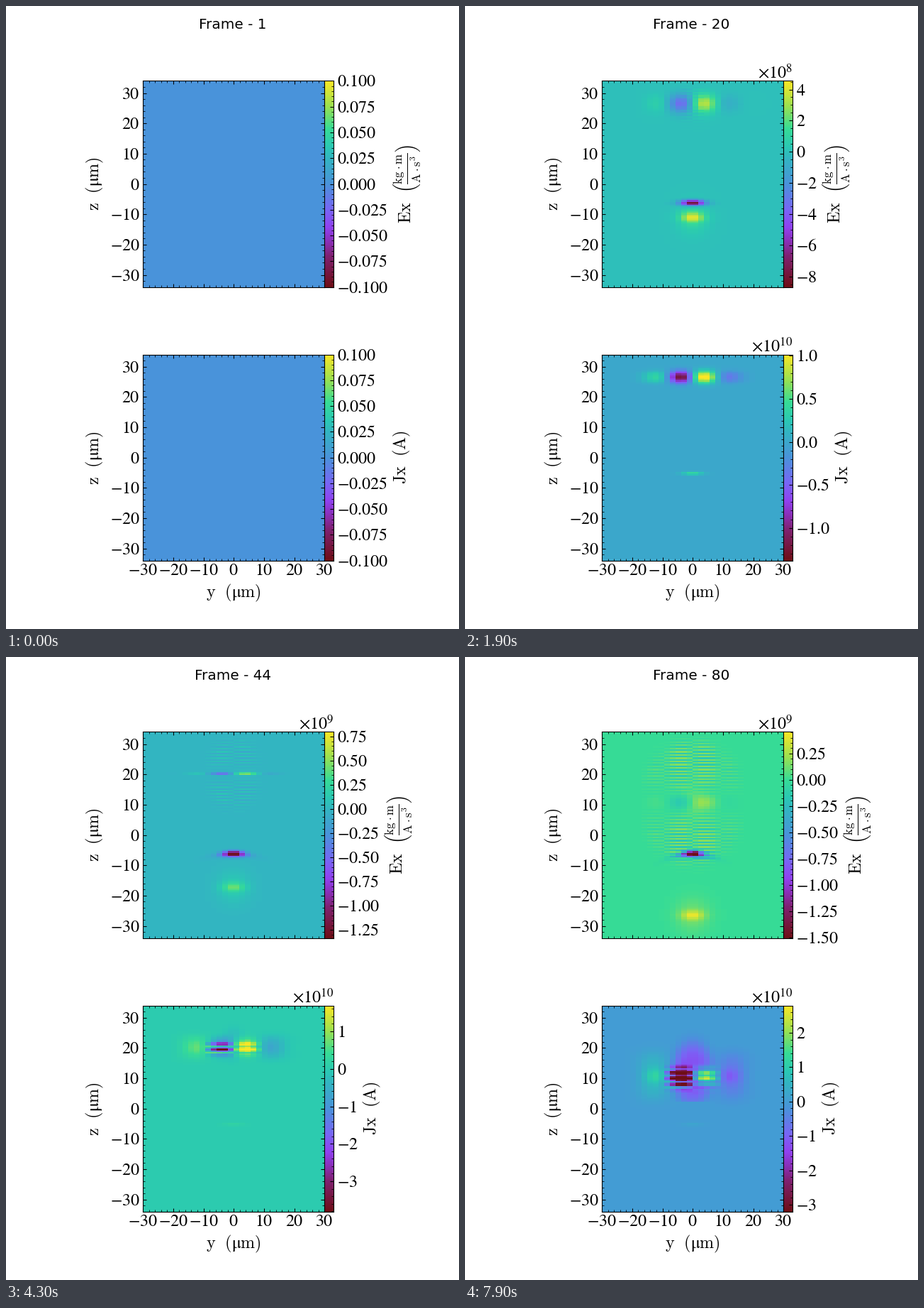
Animation of 639 by 877 pixels, one loop 8000 ms. Source, as a matplotlib script:

```python
import numpy as np
import matplotlib.pyplot as plt
from matplotlib.animation import FuncAnimation
from matplotlib.colors import LinearSegmentedColormap
from matplotlib.ticker import AutoMinorLocator, MaxNLocator

W, H, DPI = 639, 877, 128
PX = 72 / DPI  # points per pixel
FRAMES = 80
LEFT, SIDE, BAR = 193.2, 256, 12.8
TALL = SIDE * 68 / 60

plt.rcParams.update({
    "font.family": "Liberation Serif",
    "font.size": 24 * PX,
    "mathtext.fontset": "stix",
    "axes.linewidth": 1.07 * PX,
})

CMAP = LinearSegmentedColormap.from_list("tree", [
    (0, "#6e0e17"), (0.15, "#7f2272"), (0.22, "#8a30b8"), (0.29, "#9042f0"),
    (0.375, "#7866f5"), (0.5, "#4a93db"), (0.625, "#33b5c2"),
    (0.68, "#2bc8b4"), (0.77, "#37dc96"), (0.88, "#9ce150"), (1, "#fbe725"),
])

# Cell centres of the 32 x 128 grid
y = ((np.arange(32) + 0.5) / 32 * 60 - 30)[None, :]
z = ((np.arange(128) + 0.5) / 128 * 68 - 34)[:, None]
stripe = (-1.0) ** np.arange(128)[:, None]


def bell(u, width, power=2):
    return np.exp(-np.abs(u / width) ** power)


def ramp(n, start, end):
    return np.clip((n - start) / (end - start), 0, 1)


beam = np.sin(2 * np.pi * y / 18.75) * bell(y, 9.5) / 0.79
lobes = np.sign(beam) * np.sqrt(np.abs(beam))


def beam_depth(n):
    return z - (31.45 - 0.263 * n)


def ex_burst(n):
    return 0.54 * bell(n - 36, 8.5, 4)


def ex_limits(n):
    lo = -1.54 * (1 - np.exp(-max(n - 2, 0.3) / 20.5))
    hi = 0.455 * ramp(n, 0, 12) + ex_burst(n)
    return lo, hi


def jx_limits(n):
    lo = np.interp(n, (0, 12, 19, 30, 43, 79), (0, -.51, -1.38, -3.55, -3.81, -3.2))
    hi = min(0.058 * max(n - 1.5, 0.3), 1.69) + 0.00085 * max(n - 43, 0) ** 2
    return lo, hi


def ex_field(n):
    d = beam_depth(n)
    late = ramp(n, 43, 62)

    # Beam lobes, the thin front, and ripples inside a growing disc
    f = beam * (0.38 * bell(n - 14, 14) * bell(d, 1 + 0.1 * n)
                + 0.17 * late * bell(d, 2.3)
                + 1.9 * ex_burst(n) * bell(d, 0.4))
    disc = 1 / (1 + np.exp(np.hypot(1.1 * y, d) - 0.25 * n))
    f = f + 0.0022 * n * stripe * lobes * disc * (1 - bell(d, n / 12))
    f = f + 0.08 * ramp(n, 55, 79) * bell(y, 4) * bell(d, 6)

    # Pulse moving down
    u = z + 6.1 + 0.257 * n
    pulse = bell(y, 3.6) * bell(u, min(1.5, 0.08 * n))
    halo = bell(np.hypot(y, u), min(5.5, 0.25 * n))
    f = f + ramp(n, 0, 15) * (0.31 * pulse + 0.13 * halo)

    # Fixed emitter, bending into an arc
    bend = ramp(n, 12, 62)
    arc = bell(z + 6.2 + 0.022 * bend * y ** 2, 0.95)
    return f + ex_limits(n)[0] * arc * (bell(y, 4 - bend) + 0.3 * bend * bell(y, 6.5))


def jx_field(n):
    d = beam_depth(n)
    hi = jx_limits(n)[1]
    left = y < 0

    # Beam lobes split into layers that multiply with time
    f = 1.1 * hi * np.where(left, 1.1, 1) * beam * bell(d, min(2.4, 1 + 0.05 * n))
    layers = -np.cos(np.pi * (d - 0.2)) * bell(d + 0.01 * n, 0.045 * n + 0.1, 4)
    inner = lobes * (np.abs(y) < 9.4) * np.where(left, 1, 0.35)
    f = f + 2.1 * ramp(n, 20, 32) * inner * layers

    # Side lobes and the spreading negative cloud
    wing = bell(y + 13, 5) - bell(y - 13, 5)
    f = f + 0.007 * n * wing * bell(d, 0.1 * n, 4)
    size = 0.13 * n
    cloud = bell(np.hypot(y / (0.65 * size), (d - 1) / size), 1, 4)
    f = f - 1.25 * ramp(n, 35, 75) * cloud * (d > -8.7)

    # Fixed emitter
    glow = ramp(n, 0, 12) * (0.23 + 0.42 * bell(n - 12, 9))
    return f + glow * bell(y, 3.6) * bell(z + 5.2, 0.5)


def box(left, top, width):
    return [left / W, 1 - (top + TALL) / H, width / W, TALL / H]


class Panel:
    """Field map with its own colour bar."""

    def __init__(self, fig, top, name, field, limits, power):
        self.field, self.limits, self.power = field, limits, power
        ax = self.ax = fig.add_axes(box(LEFT, top, SIDE))
        self.img = ax.imshow(np.zeros((128, 32)), cmap=CMAP, origin="lower",
                             extent=(-30, 30, -34, 34), aspect="auto",
                             interpolation="nearest")
        marks = range(-30, 31, 10)
        names = [f"${v}$" for v in marks]
        ax.set_xticks(marks, names)
        ax.set_yticks(marks, names)
        for axis in (ax.xaxis, ax.yaxis):
            axis.set_minor_locator(AutoMinorLocator(5))
        ax.set_ylabel(r"$\rm{z}\ \ (\rm{μm})$", math_fontfamily="cm",
                      labelpad=6.5 * PX)

        cax = self.cax = fig.add_axes(box(LEFT + SIDE, top, BAR))
        cax.imshow(np.linspace(0, 1, 256)[:, None], cmap=CMAP, origin="lower",
                   extent=(0, 1, 0, 1), transform=cax.transAxes, aspect="auto")
        cax.set_xlim(0, 1)
        cax.set_xticks([])
        cax.yaxis.tick_right()
        cax.yaxis.set_label_position("right")
        cax.yaxis.set_minor_locator(AutoMinorLocator())
        cax.set_ylabel(name, math_fontfamily="cm", labelpad=5.3 * PX)

        for a in (ax, cax):
            for which, size, width in (("major", 4.67, 1.07), ("minor", 2.67, 0.8)):
                a.tick_params(which=which, direction="in", length=size * PX,
                              width=width * PX, pad=4.67 * PX)
        ax.tick_params(which="both", top=True, right=True)
        self.offset = fig.text((LEFT + SIDE + BAR) / W, 1 - (top - 4) / H, "",
                               ha="right", va="baseline")

    def draw(self, n):
        lo, hi = self.limits(n) if n else (-0.1, 0.1)
        self.img.set_data(self.field(n) if n else np.zeros((128, 32)))
        self.img.set_clim(lo, hi)

        locs = MaxNLocator(9, steps=[1, 2, 2.5, 5, 10]).tick_values(lo, hi)
        eps = (hi - lo) * 1e-6
        locs = locs[(locs >= lo - eps) & (locs <= hi + eps)]
        e = int(np.floor(np.log10(np.abs(locs).max()) + 1e-9)) if n else 0
        vals = locs / 10.0 ** e
        step = f"{vals[1] - vals[0]:.6g}"
        places = len(step.partition(".")[2])
        self.cax.set_yticks(locs, [f"${round(v, 6) + 0.0:.{places}f}$" for v in vals])
        self.cax.set_ylim(lo, hi)
        self.offset.set_text(rf"$\times 10^{{{self.power + e}}}$" if n else "")


fig = plt.figure(figsize=(W / DPI, H / DPI), dpi=DPI, facecolor="white")
title = fig.suptitle("", y=1 - 16.9 / H, family="DejaVu Sans", fontsize=20 * PX)

upper = Panel(
    fig, 105.45,
    r"$\rm{Ex}\ \ \left(\frac{\rm{kg}\cdot\rm{m}}{\rm{A}\cdot\rm{s}^{3}}\right)$",
    ex_field, ex_limits, 9)
lower = Panel(fig, 490.6, r"$\rm{Jx}\ \ (\rm{A})$", jx_field, jx_limits, 10)
upper.ax.tick_params(labelbottom=False)
lower.ax.set_xlabel(r"$\rm{y}\ \ (\rm{μm})$", math_fontfamily="cm",
                    labelpad=5.3 * PX)


def update(n):
    title.set_text(f"Frame - {n + 1}")
    for panel in (upper, lower):
        panel.draw(n)
    return []


anim = FuncAnimation(fig, update, frames=FRAMES, interval=100, repeat=True)
plt.show()
```
